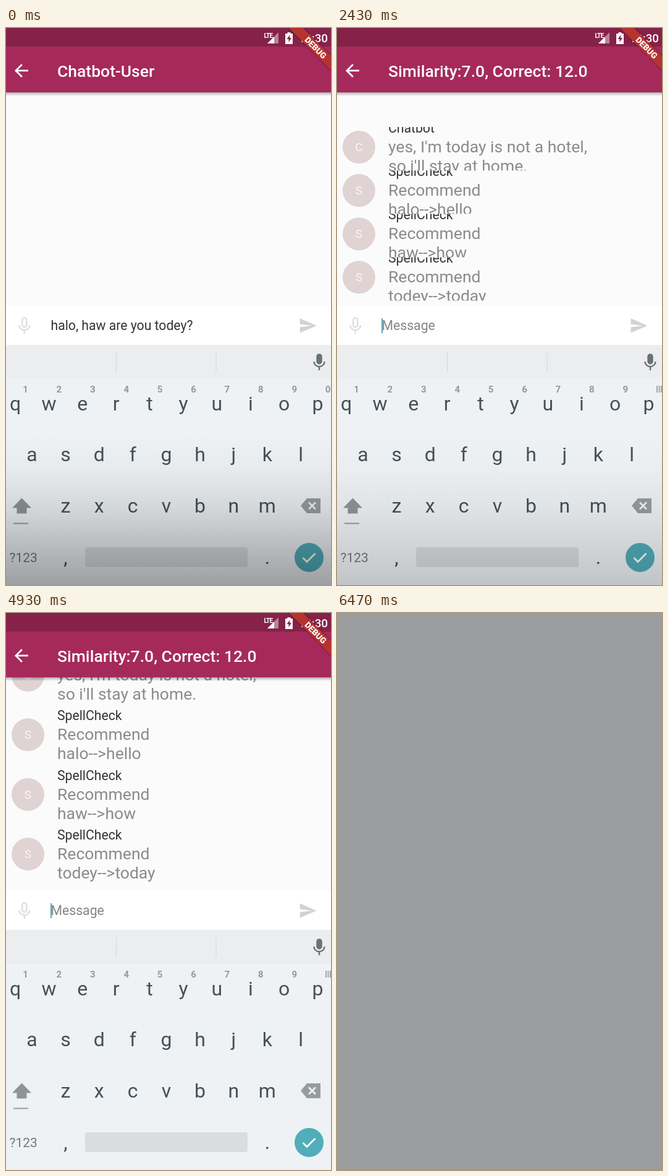
Recreate the animation shown at these times as an HTML page. Size 526 by 900 pixels, loop 6510 ms.

```html
<!DOCTYPE html>
<html lang="en">
<head>
<meta charset="utf-8">
<title>Chat</title>
<style>
  html, body { margin: 0; width: 100%; height: 100%; overflow: hidden; background: #fbfbfb; }
  svg { display: block; font-family: Roboto, sans-serif; }
  .mid { text-anchor: middle; }
  .title { font-size: 26.5px; font-weight: 500; fill: #fff; }
  .name { font-size: 21.2px; fill: #333; }
  .body { font-size: 26.5px; fill: #8b8b8b; }
  .key { font-size: 32px; fill: #465157; }
  .digit { font-size: 15px; font-weight: 700; fill: #949a9d; }
</style>
</head>
<body>
<svg id="stage" width="526" height="900" viewBox="0 0 526 900"></svg>
<script>
const LOOP = 6510, SEND = 2130, SLIDE = 2200, END = 6470, BLINK = 465, ITEM = 96.4;
const stage = document.getElementById('stage');
const $ = id => document.getElementById(id);
const clamp = v => Math.max(0, Math.min(1, v));
const easeOut = v => 1 - (1 - v) ** 2.5;

const text = (x, y, cls, s, more = '') => `<text x="${x}" y="${y}" class="${cls}" ${more}>${s}</text>`;
const rect = (x, y, w, h, fill, more = '') =>
  `<rect x="${x}" y="${y}" width="${w}" height="${h}" fill="${fill}" ${more}/>`;
const path = (d, fill, more = '') => `<path d="${d}" fill="${fill}" ${more}/>`;
const gradient = (id, stops, color = '#000') =>
  `<linearGradient id="${id}" x2="0" y2="1">` + stops.map(([at, alpha]) =>
    `<stop offset="${at}" stop-color="${color}" stop-opacity="${alpha}"/>`).join('') + '</linearGradient>';

const mic = (x, y, color, body) =>
  `<g transform="translate(${x} ${y}) scale(1.4)" fill="none" stroke="${color}" stroke-width="1.7">
    <rect x="9.5" y="2.8" width="5" height="10.6" rx="2.5" fill="${body}"/>
    <path d="M5.9 11C5.9 14.3 8.7 16.9 12 16.9S18.1 14.3 18.1 11M12 17V21"/></g>`;

const message = (who, lines, i) => `<svg id="m${i}" width="526">
  <g id="c${i}">
    <circle cx="35.5" cy="45.5" r="26.5" fill="#e0d3d3"/>
    ${text(35.5, 52, 'mid', who[0], 'font-size="19" fill="#faf5f5"')}
    ${text(83, 22, 'name', who)}
    ${lines.map((s, k) => text(83, 54 + 31 * k, 'body', s)).join('')}
  </g></svg>`;

const row = (letters, x, y) => [...letters].map((c, i) => text(x + 54.4 * i, y, 'key mid', c)).join('');

const chat = [
  ['Chatbot', ["yes, I'm today is not a hotel,", "so i'll stay at home."]],
  ['SpellCheck', ['Recommend', 'halo--&gt;hello']],
  ['SpellCheck', ['Recommend', 'haw--&gt;how']],
  ['SpellCheck', ['Recommend', 'todey--&gt;today']]
];

const header = `
  ${rect(0, 104, 526, 6, 'url(#shadow)')}
  ${rect(0, 0, 526, 30, '#862249')}
  ${rect(0, 30, 526, 74, '#a52a5b')}
  ${path('M20 11H7.83l5.59-5.59L12 4l-8 8 8 8 1.41-1.41L7.83 13H20z', '#fff',
    'transform="translate(8.5 52.5) scale(1.37)"')}
  <text id="title" x="83" y="78.5" class="title"></text>
  ${text(417.5, 16, '', 'LTE', 'font-size="10" font-weight="700" fill="#fff" letter-spacing="-.8"')}
  ${path('M441 7V25H423Z', '#b9849b')}
  ${path('M434 14V25H423Z', '#fff')}
  ${path('M452 9H455.5V7H460.5V9H464V26H452Z', '#fff')}
  ${path('M459.5 11L454.5 18H457.5V23L462 16H459Z', '#862249')}
  ${text(473.5, 23, '', '12:30', 'font-size="18.7" font-weight="500" fill="#fff"')}
  <g transform="translate(533 0) rotate(45)">
    ${rect(-70, 35, 140, 20, '#000', 'opacity=".15"')}
    ${rect(-70, 37, 140, 16, '#b6332f')}
    ${text(0, 50, 'mid', 'DEBUG', 'font-size="13.5" font-weight="900" fill="#fff"')}
  </g>`;

const input = `
  ${rect(0, 449, 526, 63, '#fff')}
  ${mic(13, 464.5, '#dedede', 'none')}
  <text id="field" x="72.5" y="488" font-size="21.2"></text>
  ${rect(0, 469, 2, 24, '#58a9c0', 'id="cursor"')}
  ${path('M2 21L23 12 2 3v7l15 2-15 2z', '#d2d2d2', 'transform="translate(473 465.5) scale(1.29)"')}`;

const keyboard = `
  ${rect(0, 512, 526, 388, '#eef2f5')}
  ${rect(0, 512, 526, 55, '#ebedef')}
  ${rect(178, 524, 1, 32, '#d3d6d8')}
  ${rect(339.5, 524, 1, 32, '#d3d6d8')}
  ${mic(490.2, 523.5, '#697276', '#697276')}
  ${[...'123456789'].map((c, i) => text(31.5 + 54.4 * i, 589, 'digit mid', c)).join('')}
  ${text(521, 589, 'digit mid', '0', 'id="zero"')}
  <g id="bars">${[517, 520.5, 524].map(x => rect(x, 578, 2, 11, '#a2a7aa')).join('')}</g>
  ${row('qwertyuiop', 15, 618)}
  ${row('asdfghjkl', 42, 700)}
  ${row('zxcvbnm', 96.4, 783)}
  ${path('M25.5 759.5L41 775.5H33.5V784.5H17.5V775.5H10Z', '#8e9496')}
  ${rect(12, 799.5, 24, 2, '#969b9d')}
  ${path('M487 760H509V784H487L477 772Z', '#969da0')}
  ${path('M490 766.5L501 777.5M501 766.5L490 777.5', 'none', 'stroke="#f2f4f5" stroke-width="2.6"')}
  ${text(5.5, 863, '', '?123', 'font-size="21" fill="#70797e"')}
  ${text(96.5, 866, 'key mid', ',')}
  ${rect(128, 839, 263, 32, '#dadcde', 'rx="4"')}
  ${text(423, 866, 'key mid', '.')}
  <circle cx="490.5" cy="855.5" r="23.5" fill="#51adb9"/>
  ${path('M480.5 856L487 862.5L500.5 849', 'none', 'stroke="#fff" stroke-width="2.8"')}`;

stage.innerHTML = `<defs>
    ${gradient('shadow', [[0, .3], [1, 0]])}
    ${gradient('low', [[0, 0], [.25, .03], [.5, .11], [.8, .25], [1, .34]])}
    ${gradient('high', [[0, 0], [.25, .06], [.65, .22], [1, .33]])}
  </defs>
  ${rect(0, 0, 526, 900, '#fbfbfb')}
  <g id="list">${chat.map(([who, lines], i) => message(who, lines, i)).join('')}</g>
  ${header}${input}${keyboard}
  ${rect(0, 650, 526, 250, 'url(#low)', 'id="shadeLow"')}
  ${rect(0, 540, 526, 360, 'url(#high)', 'id="shadeHigh"')}
  ${rect(0, 0, 526, 900, '#9c9d9f', 'id="cover"')}`;

const show = (id, on) => $(id).setAttribute('visibility', on ? 'visible' : 'hidden');
const fade = (id, v) => $(id).setAttribute('opacity', clamp(v));

function draw(t) {
  const sent = t >= SEND;
  const cursorOn = t >= 260 && Math.floor((t - 260) / BLINK) % 2 === 0;

  $('title').textContent = t >= SLIDE ? 'Similarity:7.0, Correct: 12.0' : 'Chatbot-User';
  $('field').textContent = sent ? 'Message' : 'halo, haw are you todey?';
  $('field').setAttribute('fill', sent ? '#858585' : '#333');
  $('cursor').setAttribute('x', sent ? 72 : 302);
  show('cursor', cursorOn);
  show('zero', !sent && !cursorOn);
  show('bars', sent || cursorOn);

  // Messages unfold from their middle lines and push the list upwards.
  const grow = easeOut(clamp((t - SLIDE) / 570));
  show('list', grow > 0);
  chat.forEach((_, i) => {
    const h = ITEM * grow, box = $('m' + i);
    box.setAttribute('y', 440.5 - h * (chat.length - i));
    box.setAttribute('height', h);
    $('c' + i).setAttribute('transform', `translate(0 ${(h - ITEM) / 2})`);
  });

  fade('shadeLow', 1 - (t - SEND) / 670);
  fade('shadeHigh', (t - 6130) / 170);
  show('cover', t >= END);
}

const start = performance.now();
function tick(now) {
  draw(Math.max(0, now - start) % LOOP);
  requestAnimationFrame(tick);
}
draw(0);
requestAnimationFrame(tick);
</script>
</body>
</html>
```
